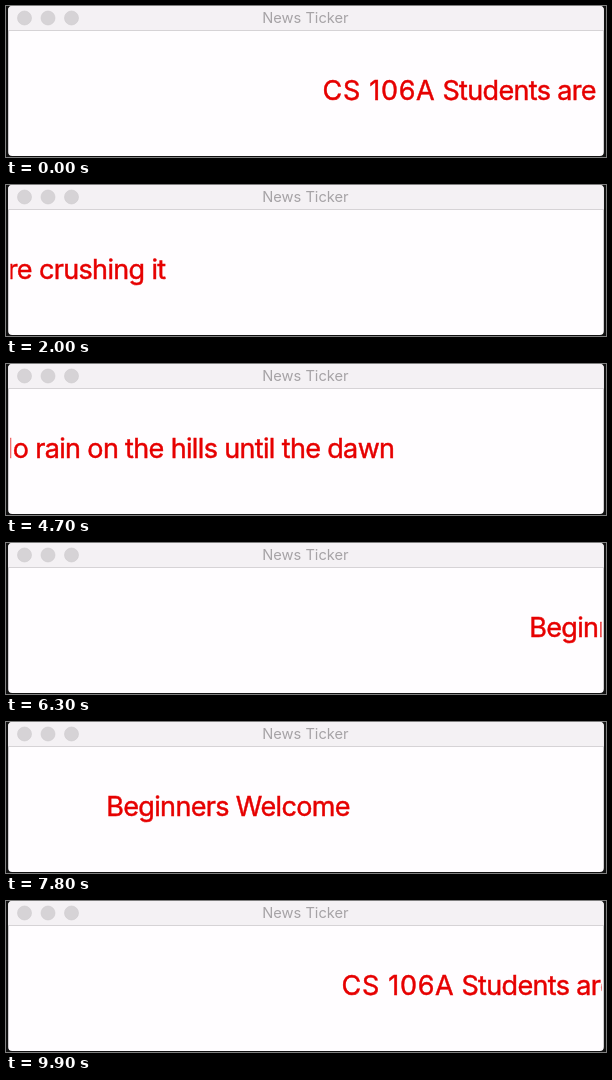
An HTML page for the animation above (10 s loop, 600 by 151 pixels).

```html
<!DOCTYPE html>
<html lang="en">
<head>
<meta charset="utf-8">
<title>News Ticker</title>
<style>
  html, body { margin: 0; width: 100%; height: 100%; overflow: hidden; background: #111; }
  svg { display: block; }
  text { font-family: Inter, "Liberation Sans", sans-serif; font-optical-sizing: none; white-space: pre; }
  .title { font-size: 14.7px; fill: #a6a3a6; text-anchor: middle; }
  .news { font-size: 27px; letter-spacing: -0.65px; fill: #e60000; stroke: #e60000; stroke-width: 0.45px; }
  .wide { letter-spacing: 0.7px; }
</style>
</head>
<body>
<svg width="600" height="151" viewBox="0 0 600 151">
  <defs>
    <clipPath id="win"><rect x="2.2" width="595.6" height="150" rx="4"/></clipPath>
    <clipPath id="pane"><rect x="4.5" y="25" width="591" height="125"/></clipPath>
  </defs>
  <g clip-path="url(#win)">
    <rect width="600" height="151" fill="#fffdff"/>
    <rect width="600" height="24" fill="#f4f1f4"/>
    <rect y="24" width="600" height="1" fill="#d6d3d6"/>
  </g>
  <g fill="#d6d3d6" stroke="#cecbce" stroke-width="0.6">
    <circle cx="18.5" cy="12" r="7"/>
    <circle cx="42" cy="12" r="7"/>
    <circle cx="65.5" cy="12" r="7"/>
  </g>
  <text class="title" x="299.4" y="17.4">News Ticker</text>
  <g clip-path="url(#pane)">
    <text class="news" y="94"><tspan class="wide">CS 106A</tspan> Students are crushing it</text>
    <text class="news" y="94">No rain on the hills until the dawn</text>
    <text class="news" y="94">Beginners Welcome</text>
  </g>
</svg>
<script>
  const TICK = 100, TICKS = 100, STEP = 28.2;
  const lines = document.querySelectorAll(".news");

  // Each pass: headline, first and last tick, left edge at a reference tick.
  const passes = [
    { line: 0, from: 0, to: 25, ref: 0, x: 316.5 },
    { line: 1, from: 26, to: 60, ref: 36, x: 297.2 },
    { line: 2, from: 61, to: 90, ref: 63, x: 523.2 },
    { line: 0, from: 91, to: 99, ref: 99, x: 335.5 }
  ];

  function draw(ms) {
    const n = Math.floor(ms / TICK) % TICKS;
    const pass = passes.find(p => n >= p.from && n <= p.to);
    lines.forEach((el, i) => {
      el.style.display = i === pass.line ? "" : "none";
    });
    lines[pass.line].setAttribute("x", pass.x - STEP * (n - pass.ref));
  }

  const start = performance.now();
  function loop() {
    draw(performance.now() - start);
    requestAnimationFrame(loop);
  }
  loop();
</script>
</body>
</html>
```
